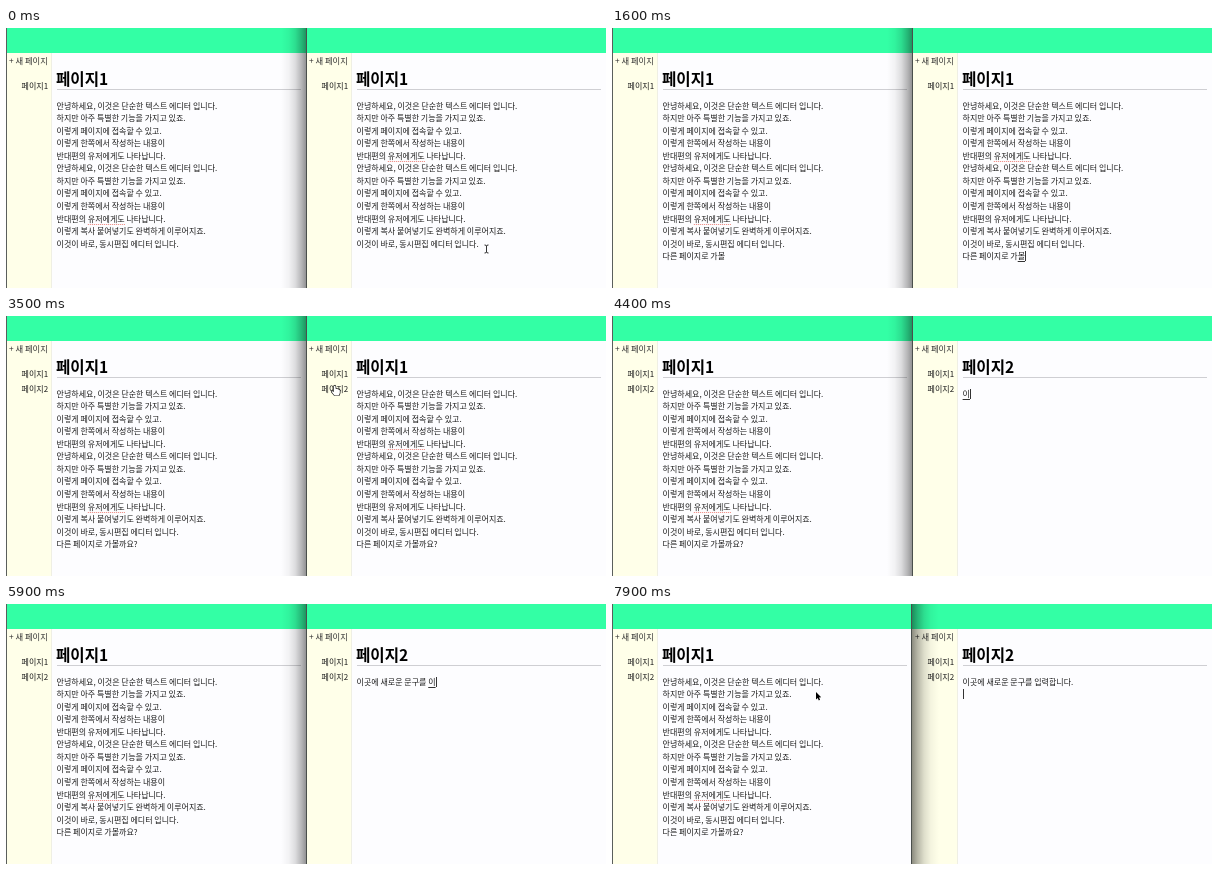
An HTML page with a canvas for the animation above (8 s loop, 600x260 px).

```html
<!DOCTYPE html>
<html lang="ko">
<head>
<meta charset="utf-8">
<title>동시편집 에디터</title>
<style>
html, body { margin: 0; width: 100%; height: 100%; overflow: hidden; background: #fdfdff; }
canvas { display: block; width: 600px; height: 260px; }
</style>
</head>
<body>
<canvas id="stage"></canvas>
<script>
const W = 600, H = 260, LOOP = 8000, STEP = 100;
const FONT = '"Noto Sans CJK KR", "Noto Sans CJK", "Noto Sans KR", sans-serif';
const LINE_TOP = 80.6, LINE_GAP = 12.55;

const intro = [
  '안녕하세요, 이것은 단순한 텍스트 에디터 입니다.',
  '하지만 아주 특별한 기능을 가지고 있죠.',
  '이렇게 페이지에 접속할 수 있고.',
  '이렇게 한쪽에서 작성하는 내용이',
  '반대편의 유저에게도 나타납니다.'
];
const body = [...intro, ...intro,
  '이렇게 복사 붙여넣기도 완벽하게 이루어지죠.',
  '이것이 바로, 동시편집 에디터 입니다.'];

const canvas = document.getElementById('stage');
const ctx = canvas.getContext('2d');
const dpr = window.devicePixelRatio || 1;
canvas.width = W * dpr;
canvas.height = H * dpr;

// Hangul input: every key press gives the settled text and the syllable in progress.
const LEADS = 'ㄱㄲㄴㄷㄸㄹㅁㅂㅃㅅㅆㅇㅈㅉㅊㅋㅌㅍㅎ';
const TAILS = ' ㄱㄲㄳㄴㄵㄶㄷㄹㄺㄻㄼㄽㄾㄿㅀㅁㅂㅄㅅㅆㅇㅈㅊㅋㅌㅍㅎ';

function keyStates(text) {
  const states = [{ done: '', live: '' }];
  let done = '', open = null;
  for (const ch of text) {
    const code = ch.charCodeAt(0) - 0xAC00;
    if (code < 0 || code > 11171) {
      done += ch;
      open = null;
      states.push({ done, live: '' });
      continue;
    }
    const tail = code % 28, lead = LEADS[Math.floor(code / 588)];
    const borrowed = TAILS.indexOf(lead);
    // A consonant first joins an open syllable before it.
    if (open && borrowed > 0) {
      states.push({ done: done.slice(0, -1), live: String.fromCharCode(open.charCodeAt(0) + borrowed) });
    } else {
      states.push({ done, live: lead });
    }
    const base = String.fromCharCode(0xAC00 + code - tail);
    states.push({ done, live: base });
    if (tail) states.push({ done, live: ch });
    open = tail ? null : ch;
    done += ch;
  }
  return states;
}

const typed1 = keyStates('다른 페이지로 가볼까요?');
const typed2 = keyStates('이곳에 새로운 문구를 입력합니다.');
const pace1 = [[400, 0], [1200, 15], [1600, 20], [1800, 24], [2000, 25]];
const pace2 = [[4200, 0], [4400, 2], [5200, 10], [5600, 21], [6500, 39]];

function along(points, t) {
  if (t <= points[0][0]) return points[0][1];
  for (let i = 1; i < points.length; i++) {
    const [t0, a] = points[i - 1], [t1, b] = points[i];
    if (t <= t1) return a + (b - a) * (t - t0) / (t1 - t0);
  }
  return points[points.length - 1][1];
}

const typing = (states, pace, t) =>
  states[Math.min(states.length - 1, Math.floor(along(pace, t) + 1e-6))];

function rect(x, y, w, h, color) {
  ctx.fillStyle = color;
  ctx.fillRect(x, y, w, h);
}

function label(text, x, y, size = 8, weight = 400, color = '#1c1c1c') {
  ctx.font = `${weight} ${size}px ${FONT}`;
  ctx.fillStyle = color;
  ctx.fillText(text, x, y);
}

function textWidth(text) {
  ctx.font = `400 8px ${FONT}`;
  return ctx.measureText(text).width;
}

const lineY = i => LINE_TOP + i * LINE_GAP;

function caret(x, line) {
  rect(Math.round(x), Math.round(lineY(line) - 8), 1, 10, '#333');
}

function spellMark(x, line) {
  const from = x + textWidth('반대편의 '), width = textWidth('유저에게도');
  for (let d = 0; d < width; d += 2) {
    rect(from + d, Math.round(lineY(line) + 2), 1, 1, '#ee8078');
  }
}

function pane(x, page, hasSecond) {
  rect(x, 0, 300, H, '#fdfdff');
  rect(x, 25, 45, H - 25, '#ffffe9');
  rect(x + 45, 25, 1, H - 25, '#efefe4');
  rect(x, 0, 300, 25, '#33ffa5');
  label('+ 새 페이지', x + 3, 36.4, 8.3, 400, '#333');
  label('페이지1', x + 15.6, 60.7);
  if (hasSecond) label('페이지2', x + 15.6, 76.3);
  label('페이지' + page, x + 50, 57.2, 15.6, 700, '#000');
  rect(x + 51, 61, 244, 1, '#cfcfd3');
}

function firstPage(x, t, markLine) {
  body.forEach((s, i) => label(s, x, lineY(i)));
  spellMark(x, markLine);
  const s = typing(typed1, pace1, t);
  label(s.done + s.live, x, lineY(12));
}

function inputMarks(x, line, s, showCaret) {
  const start = x + textWidth(s.done), width = textWidth(s.live);
  if (s.live) rect(start, Math.round(lineY(line) + 2), width, 1, '#333');
  if (showCaret) caret(start + width, line);
}

function rightContent(t) {
  const x = 350.6;
  if (t < 3700) {
    firstPage(x, t, 4);
    if (t < 400) {
      if (t >= 100) caret(x + textWidth(body[11]), 11);
      return;
    }
    const s = typing(typed1, pace1, t);
    const composing = t < 2000 ? s : { done: s.done + s.live, live: '' };
    inputMarks(x, 12, composing, t < 2000 || Math.floor(t / 500) % 2 === 0);
    return;
  }
  const s = typing(typed2, pace2, t);
  label(s.done + s.live, x, lineY(0));
  if (t >= 6800) {
    if (t < 7000 || t >= 7300) caret(x, 1);
  } else if (t >= 4200) {
    inputMarks(x, 0, s, true);
  }
}

function seam(leftActive) {
  const from = leftActive ? 300 : 301, to = leftActive ? 327 : 275;
  const g = ctx.createLinearGradient(from, 0, to, 0);
  [[0, .45], [.2, .29], [.45, .13], [.7, .045], [1, 0]].forEach(([p, a]) =>
    g.addColorStop(p, `rgba(0,0,0,${a})`));
  rect(Math.min(from, to), 0, Math.abs(to - from), H, g);
  rect(leftActive ? 299 : 300, 0, 1, H, '#4a4f4c');
  rect(0, 0, 1, H, '#5a5f5c');
}

function shape(points, x, y, fill, stroke, width) {
  ctx.beginPath();
  points.forEach(([px, py]) => ctx.lineTo(x + px, y + py));
  ctx.closePath();
  ctx.lineJoin = 'round';
  ctx.lineWidth = width;
  ctx.strokeStyle = stroke;
  ctx.stroke();
  ctx.fillStyle = fill;
  ctx.fill();
}

const pointers = {
  beam(x, y) {
    ctx.beginPath();
    ctx.moveTo(x - 2, y - 4);
    ctx.quadraticCurveTo(x, y - 4, x, y - 3);
    ctx.lineTo(x, y + 3);
    ctx.quadraticCurveTo(x, y + 4, x - 2, y + 4);
    ctx.moveTo(x + 2, y - 4);
    ctx.quadraticCurveTo(x, y - 4, x, y - 3);
    ctx.moveTo(x, y + 3);
    ctx.quadraticCurveTo(x, y + 4, x + 2, y + 4);
    ctx.lineWidth = 1;
    ctx.strokeStyle = '#333';
    ctx.stroke();
  },
  arrow(x, y) {
    shape([[0, 0], [0, 7.4], [1.7, 5.9], [2.8, 8.4], [4.1, 7.8], [3, 5.4], [5.2, 5.2]],
      x, y, '#000', '#fff', 1.2);
  },
  hand(x, y) {
    shape([[-1, 0], [.4, 0], [.8, 3], [2.2, 3], [3.6, 3.4], [4.8, 4.2], [4.8, 7], [3.8, 9.4],
      [-.4, 9.4], [-3.4, 5.8], [-3, 4.9], [-1.2, 6]], x, y, '#fff', '#222', 1.4);
  }
};

const moves = [
  { from: 0, to: 399, start: 0, end: 1, a: [480.5, 221], b: [480.5, 221] },
  { from: 2200, to: 3199, start: 2100, end: 2800, a: [480.5, 221], b: [324, 33.5] },
  { from: 3200, to: 3899, start: 3100, end: 3500, a: [324, 33.5], b: [329, 70] },
  { from: 3900, to: 4299, start: 3800, end: 4200, a: [329, 70], b: [405, 198] },
  { from: 7500, to: 8000, start: 7400, end: 7800, a: [405, 198], b: [204, 88] }
];

function pointer(t) {
  const m = moves.find(m => t >= m.from && t <= m.to);
  if (!m) return;
  const p = Math.min(1, (t - m.start) / (m.end - m.start));
  const e = p * p * (3 - 2 * p);
  const [x, y] = m.a.map((v, i) => v + (m.b[i] - v) * e);
  const kind = x > 346 ? 'beam' : x > 300 && y < 80 ? 'hand' : 'arrow';
  pointers[kind](x, y);
}

function draw(now) {
  const t = Math.floor((now % LOOP) / STEP) * STEP;
  ctx.setTransform(dpr, 0, 0, dpr, 0, 0);
  const hasSecond = t >= 3000;
  pane(0, 1, hasSecond);
  pane(300, t < 3700 ? 1 : 2, hasSecond);
  firstPage(50.6, t, 9);
  rightContent(t);
  seam(t >= 7900);
  pointer(t);
}

let origin = null;
function tick(now) {
  if (origin === null) origin = now;
  draw(now - origin);
  requestAnimationFrame(tick);
}
draw(0);
requestAnimationFrame(tick);
</script>
</body>
</html>
```
